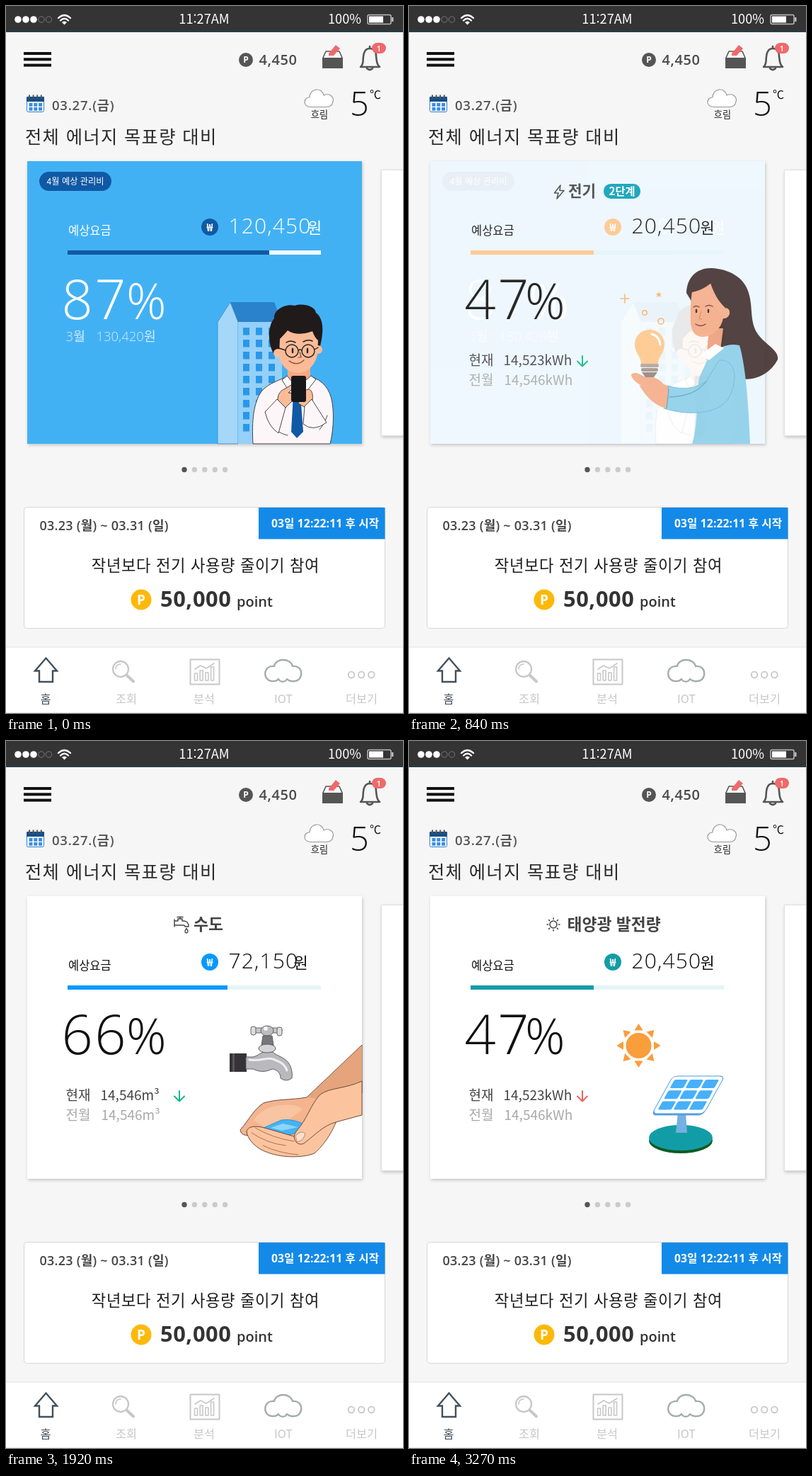
Write an HTML page that moves like this. It is 561 by 998 pixels and loops after 3.3 s.

```html
<!DOCTYPE html>
<html lang="ko">
<head>
<meta charset="utf-8">
<style>
html, body { margin: 0; width: 100%; height: 100%; overflow: hidden; background: #f6f6f7; }
svg { display: block; width: 561px; height: 998px; font-family: 'Open Sans', 'Noto Sans CJK KR', sans-serif; }
.k { font-family: 'Noto Sans CJK KR', 'Noto Sans CJK', sans-serif; }
#mix { isolation: isolate; }
#mix .scene { mix-blend-mode: plus-lighter; }
.card { filter: drop-shadow(1px 2px 2px rgba(0,0,0,.2)); }
.line { fill: none; stroke-linecap: round; stroke-linejoin: round; }
</style>
</head>
<body>
<svg id="stage" viewBox="0 0 561 998"></svg>
<script>
const text = (x, y, size, str, fill, weight = 400, extra = '') =>
  `<text x="${x}" y="${y}" font-size="${size}" fill="${fill}" font-weight="${weight}" ${extra}>${str}</text>`;
const ktext = (x, y, size, str, fill, weight = 400, extra = '') =>
  text(x, y, size, str, fill, weight, 'class="k" ' + extra);
const rect = (x, y, w, h, fill, extra = '') =>
  `<rect x="${x}" y="${y}" width="${w}" height="${h}" fill="${fill}" ${extra}/>`;
const disc = (x, y, r, fill, extra = '') => `<circle cx="${x}" cy="${y}" r="${r}" fill="${fill}" ${extra}/>`;
const path = (d, fill, extra = '') => `<path d="${d}" fill="${fill}" ${extra}/>`;
const line = (d, color, w, extra = '') =>
  `<path class="line" d="${d}" stroke="${color}" stroke-width="${w}" ${extra}/>`;
const ring = (x, y, r, color, w) => disc(x, y, r, 'none', `stroke="${color}" stroke-width="${w}"`);
const list = (n, f) => Array.from({ length: n }, (_, i) => f(i)).join('');
const mid = 'text-anchor="middle"';
const gap = n => `letter-spacing="${n}"`;
const edge = (color, w = 1) => `stroke="${color}" stroke-width="${w}" stroke-linejoin="round"`;

function statusBar() {
  return rect(0, 0, 561, 36, '#343434') + rect(0, 35.5, 561, 1.5, '#20424e') +
    list(3, i => disc(17 + i * 11, 19, 4.8, '#fff')) +
    list(2, i => ring(50 + i * 10.5, 19, 4.2, '#777', 1)) +
    line('M74 17Q82.5 9 91 17M77 20.5Q82.5 15 88 20.5', '#fff', 2.4) +
    path('M79 23Q82.5 20 86 23L82.5 26.5Z', '#fff') +
    ktext(280, 25, 18.2, '11:27AM', '#fff', 500, mid) +
    ktext(455, 25, 18.2, '100%', '#fff', 500) +
    rect(511, 12.5, 33, 13, 'none', 'rx="2" stroke="#bbb" stroke-width="1.5"') +
    rect(513, 14.5, 20, 9, '#fff') + rect(545, 16, 2.5, 6, '#bbb');
}

function header() {
  return list(3, i => rect(25, 65 + i * 8.3, 39, 4, '#111')) +
    disc(339, 76, 10, '#555') + text(339, 80.2, 12, 'P', '#fff', 700, mid) +
    text(357.5, 83, 20, '4,450', '#4a4a4a', 600, gap(.6)) +
    line('M448 73L452 64H471L475 73', '#555', 1.6) + rect(447, 73, 29, 15, '#555') +
    path('M456 67L466 55L472 60L463 70H456Z', '#f0696a') +
    line('M501 86C506 82 504 77 505 71C506 63 510 60 514 60C519 60 523 63 523 71C524 77 523 82 528 86Z', '#555', 2.6) +
    line('M514 57V60M510 88Q514 92 518 88', '#555', 2.6) +
    rect(517, 52, 20, 15, '#f0696a', 'rx="7.5"') + text(527, 63.5, 11, '1', '#fff', 600, mid) +
    rect(29.5, 128.5, 24, 21, '#fff', 'rx="2" stroke="#2f7bc8"') + rect(29, 128, 25, 7, '#164f87', 'rx="1"') +
    list(4, i => rect(32 + i * 5.6, 125.5, 2, 5, '#555')) +
    list(6, i => rect(32.5 + i % 3 * 6.8, 137 + (i > 2) * 6, 5, 4.8, '#3a8ee6')) +
    text(65, 147, 18.6, '03.27.(금)', '#555', 600, gap(.75)) +
    path('M430 142.5C419 142 420 129 429 129C429 116 446 114 449 126C458 122 464 129 462 135C461 141 457 142.5 453 142.5Z', '#fff', edge('#999', 1.2)) +
    ktext(443, 158, 13.2, '흐림', '#222', 400, mid) +
    text(486, 155, 47, '5', '#111', 350) + ktext(514, 131, 16, '℃', '#111', 500) +
    ktext(27, 193.5, 25.3, '전체 에너지 목표량 대비', '#2a2a2a', 300, gap(1.35));
}

function eventCard() {
  return list(5, i => disc(252 + i * 14.4, 654.5, 3.7, i ? '#cbcbcd' : '#555')) +
    rect(25.5, 707.5, 510, 171, '#fff', 'rx="4" stroke="#d6d6d8"') +
    rect(357, 708, 178.5, 44.5, '#138ae8') +
    text(47.5, 740, 18, '03.23 (월) ~ 03.31 (일)', '#444', 600, gap(.25)) +
    text(375, 735.5, 15.6, '03일 12:22:11 후 시작', '#fff', 700, gap(.15)) +
    ktext(282, 798, 22.2, '작년보다 전기 사용량 줄이기 참여', '#1c1c1c', 400, mid + ' ' + gap(.65)) +
    disc(191, 838, 14.5, '#fdb90a') + text(191, 845, 19, 'P', '#fff', 700, mid) +
    text(218, 848, 30.8, '50,000', '#333', 700, gap(.6)) + text(326, 848, 20, 'point', '#333', 600);
}

function navBar() {
  const grey = '#c7c7c9';
  return rect(0, 905, 561, 93, '#fff') + rect(0, 904.5, 561, 1, '#e4e4e6') + rect(0, 997, 561, 1, '#ececec') +
    line('M41 938.5L56.5 920.5L72 938.5H66V954H47V938.5Z', '#40505c', 2.4, 'style="stroke-linejoin:miter"') +
    ring(162, 936, 11, grey, 2.3) + line('M155 936Q155 929 162 929', grey, 1.5) + line('M171 945L180 953.5', grey, 4) +
    rect(260.5, 922.5, 41, 35, 'none', edge(grey, 2)) +
    list(4, i => rect(266.5 + i * 7.7, 942 - [0, 4, 1, 9][i], 4, 10 + [0, 4, 1, 9][i], 'none', edge(grey, 1.6))) +
    line('M267 936L275 931L283 935L294 928', grey, 1.6) +
    line('M379 932C381 920 402 920 405 932C421 930 421 953 407 953C402 954 399 952 397 950C394 955 388 955 385 950C382 954 378 953 376 953C362 952 363 930 379 932Z', '#a3acad', 2.3) +
    list(3, i => ring(488 + i * 14.2, 944, 4.3, grey, 1.8)) +
    ['홈', '조회', '분석', 'IOT', '더보기'].map((s, i) =>
      ktext([56, 170, 280, 392, 502.5][i], 984, 16.3, s, i ? grey : '#40505c', 400, mid)).join('');
}

// Amount, progress bar and large percentage shared by all cards
function meter({ color, end, price, pct, ink = '#111', rest = '#e5f5f8' }) {
  const wonX = 315 + (price.length === 7 ? 111 : pct === 66 ? 91.5 : 96.5);
  return ktext(88, 323, 16.5, '예상요금', ink) +
    disc(288, 312, 12, color) + ktext(288, 317.5, 15, '₩', '#fff', 700, mid) +
    text(314.5, 321, 30, price, ink, 350, gap(1.1)) + ktext(wonX, 321, 22, '원', ink, 300) +
    rect(87, 345, 358, 6, rest) + rect(87, 345, end - 87, 6, color) +
    text(78.5, 442, 77.5, pct, ink, 300, gap(2.5)) + text(pct === 47 ? 164 : 170, 442, 70, '%', ink, 300);
}

const usage = (now, before, arrow) =>
  ktext(84.5, 507, 19, '현재', '#444') + ktext(133.5, 507, 19, now, '#444') +
  ktext(84.5, 535, 19, '전월', '#a9a9a9') + ktext(134.5, 535, 19, before, '#a9a9a9') +
  line('M245 494V508M238 501.5L245 508.5L252 501.5', arrow, 2);

function building() {
  return path('M299 446L317 418L328 446V618H299Z', '#a4d7f8', edge('#3d86c4', .8)) +
    rect(328, 446, 62, 172, '#94d0f8') + path('M317 418H379L390 446H328Z', '#2a82cc') +
    list(27, i => rect(335 + i % 3 * 18, 454 + Math.floor(i / 3) * 17, 9, 10.5, '#2a97e8'));
}

function man() {
  const ink = edge('#3a3335', .9), skin = '#fbbb97', shirt = '#fdf6f8';
  return path('M349 618C347 585 350 560 361 544C371 532 388 528 397 523H430C447 528 458 540 461 560C464 580 462 602 458 618Z', shirt, ink) +
    path('M398 507H430V524L411 541L398 524Z', '#f3aa84') +
    path('M397 522L411 538L404 550L390 528ZM431 522L412 538L420 550L438 527Z', '#fff', ink) +
    path('M406 548H416L420 601L411 610L403 601Z', '#1059a5') +
    path('M379 492C370 478 369 452 379 441C378 428 396 420 408 423C420 419 437 424 438 433C450 442 449 462 443 484L438 492Z', '#211a1b') +
    disc(384, 490, 6, skin) + disc(441, 485, 6, skin) +
    path('M387 470Q393 464 398 458C410 466 425 462 433 459Q436 468 441 472L440 492C437 507 427 517 413 518C398 518 387 507 386 492Z', skin) +
    ring(404, 487, 9, '#222', 1.4) + ring(427, 487, 9, '#222', 1.4) +
    line('M413 486Q415.5 484 418 486M395 486L386 483M436 485L441 482', '#222', 1.4) +
    line('M405 484V489M426 484V489', '#222', 2.4) + line('M396 475Q402 471 409 475M420 474Q427 470 433 473', '#222', 1.5) +
    line('M415 488L417 496H413M400 501Q411 509 421 500', '#8c4b35', 1.2) +
    line('M367 572C372 592 381 602 398 606M443 598Q450 590 454 578', '#3a3335', .9) +
    path('M420 545C429 536 435 544 433 557L425 568L413 561Z', skin, ink) +
    path('M422 565L432 555L453 588Q434 602 420 590Z', shirt, ink) +
    `<g id="arm">` + path('M366 573L383 555L395 567L385 603Q371 594 366 573Z', shirt, ink) +
    path('M384 556C384 548 388 543 393 541L403 535L405 540L399 546L406 547L405 557L395 567Z', skin, ink) + `</g>` +
    rect(403, 522, 21, 37, '#17171a', 'rx="3"');
}

function woman() {
  const skin = '#f5ad88', blue = '#8dcfe8', seam = edge('#66b0d2', .8);
  return path('M392 405C393 383 406 370 427 370C452 371 474 383 480 405C487 428 480 449 496 467C507 480 523 487 521 499C513 515 494 530 468 526L440 485Z', '#43302f') +
    path('M424 455H444L440 486L420 500Z', '#ee9f7c') +
    path('M400 403C397 425 398 435 398 447C399 461 406 468 417 467C431 465 441 455 444 441C454 442 457 427 447 426L431 390Z', skin) +
    path('M392 405C404 404 418 400 426 391C431 406 437 417 448 427L457 400L425 374Z', '#43302f') +
    line('M402 425Q406 422 410 425M419 424Q424 421 429 424M405 449Q412 454 419 449', '#7a3d32', 1.4) +
    line('M406 429V432M423 429V432', '#382725', 2.4) + line('M413 431L410 442H414', '#d7876a', 1.1) +
    path('M424 494C440 480 452 476 467 479C477 512 480 575 482 618H400C409 590 406 554 410 525Z', blue) +
    path('M411 493L433 477L445 483L424 500Z', '#fff') +
    path('M314 520C322 514 329 523 336 524C344 522 353 526 360 534L369 537L366 548C350 545 334 542 327 535C320 531 314 525 314 520Z', skin) +
    path('M366 536C388 543 406 539 420 530L438 500C460 498 467 524 452 553C440 573 403 581 360 568L367 552Z', blue, seam) +
    path('M325 535C337 539 351 541 367 544L364 568C350 565 337 555 325 535Z', skin) +
    line('M367 541L364 568M420 530C410 544 393 551 368 552', '#4c97c0', 1);
}

function bulb() {
  const c = '#ffc78c', s = '#f9b26c';
  return path('M328 506C329 496 319 490 319 478C319 466 328 457 340 457C352 457 361 466 361 478C361 490 351 496 352 506Z', c) +
    line('M343 463Q354 466 355 478', '#fff', 3) +
    rect(327, 505, 26, 5, '#b6a39a', 'rx="2"') + rect(328, 511, 24, 5, '#a6958d', 'rx="2"') + path('M329 517H351L346 524H334Z', '#95857f') +
    line('M299 413H311M305 407V419', s, 1.6) +
    path('M353 403.5L354.3 406H357L355 408L356 411L353 409.5L350 411L351 408L349 406H351.7Z', s) +
    ring(333, 433, 3.3, s, 1.5) + ring(356, 445, 4, s, 1.6);
}

function faucet() {
  const ink = edge('#555', .9);
  return rect(316, 441, 24, 26, '#353337') + rect(320, 441, 3, 26, '#555') +
    path('M339 446H349C355 445 358 441 364 439H377C383 445 393 446 399 454C404 461 405 470 404 476Q396 482 388 476C388 468 383 464 376 463C364 469 356 466 349 463H339Z', '#b9b9bd', ink) +
    line('M344 450C361 453 371 444 382 451Q394 455 397 465', '#eee', 3) +
    path('M363 416H376L378 430H361Z', '#77777b', ink) +
    `<ellipse cx="369" cy="434" rx="12" ry="6" fill="#d4d4d7" ${ink}/>` +
    rect(347, 405, 43, 7, '#c9c9cc', `rx="3" ${ink}`) +
    rect(346, 403, 7, 12, '#ddd', `rx="3" ${ink}`) + rect(383, 404, 7, 12, '#ddd', `rx="3" ${ink}`) +
    `<ellipse cx="369" cy="409" rx="9" ry="7" fill="#bcbcc0" ${ink}/>` + disc(367, 406, 3, '#f4f4f4');
}

function hands() {
  const ink = edge('#6c4a3c', 1), light = '#fbc49e';
  return path('M503 429L425 503C402 507 383 505 364 511C350 520 344 534 331 549C332 558 343 558 350 554L410 568L446 548L503 497Z', '#f3b48e', ink) +
    path('M503 430L426 503L444 505L503 482Z', '#e5a47c') +
    path('M350 535Q363 516 389 514Q411 512 419 520L398 536L366 546Z', '#f8c4a1') +
    path('M364 546L389 535Q407 532 427 544Q404 561 379 555Z', '#45b2f2', edge('#2788cc', .8)) +
    path('M374 546L391 540L413 545L390 550Z', '#8ad6fb') +
    path('M340 551C342 543 354 543 365 546L410 559L468 534C459 558 445 574 436 582C415 590 382 588 361 577C350 571 341 561 340 551Z', light, ink) +
    line('M347 553Q369 568 395 571M352 546Q378 561 407 565M363 571Q386 582 413 584', '#a87358', 1) +
    path('M503 480C480 491 458 489 444 499C430 514 426 533 411 550C402 560 411 573 421 568C437 556 448 543 466 538L503 528Z', light, ink) +
    path('M409 557Q417 549 423 554Q420 565 411 566Z', '#fee1cc', edge('#a87358', .8));
}

function solar() {
  return `<ellipse cx="384" cy="564" rx="45" ry="18" fill="#0c5c22"/><ellipse cx="384" cy="560" rx="45" ry="18" fill="#129da6"/>` +
    path('M380 525H391L393 553H377Z', '#74b0e2') +
    `<g transform="translate(373 473) skewX(-29)">` +
    rect(0, 2.5, 73, 53, '#5aa0df', 'rx="6"') + rect(0, 0, 73, 53, '#fff', 'rx="6" stroke="#4a9ae0"') +
    list(9, i => rect(5 + i % 3 * 22, 5 + Math.floor(i / 3) * 15.3, 19, 12, '#46b0fb', 'rx="2"')) + `</g>` +
    `<g id="sun">` + disc(324.5, 430, 18, '#fa9d3b') +
    list(8, i => path('M318.5 408.5L324.5 399L330.5 408.5Z', '#fa9d3b', `transform="rotate(${i * 45} 324.5 430)"`)) + `</g>`;
}

const green = '#12b886', won = '#1059a5';
const cards = [
  rect(30, 219, 473, 399, '#42b1f4') + rect(47, 234, 102, 27, won, 'rx="13.5"') +
    ktext(98, 252, 12.2, '4월 예상 관리비', '#fff', 500, mid) +
    meter({ color: won, end: 372, price: '120,450', pct: 87, ink: '#fff', rest: '#f4faff' }) +
    text(84.5, 473, 18.5, '3월', '#d4ecfc', 300) + text(127.5, 473, 18.5, '130,420원', '#d4ecfc', 300) +
    building() + man(),
  line('M214 253L205.5 264H211L209 272L219 260.5H213Z', '#444', 1.5) +
    ktext(225, 268.5, 21.3, '전기', '#444', 700) +
    rect(275, 251, 52, 21, '#0c9fb5', 'rx="10"') + ktext(301, 267, 15.3, '2단계', '#fff', 700, mid) +
    meter({ color: '#ffc78c', end: 261, price: '20,450', pct: 47 }) +
    usage('14,523kWh', '14,546kWh', green) + woman() + bulb(),
  line('M238 252V262M238 254H243V251H249V254H251C256 254 258 258 258 262H253Q253 260 250 260H238M246 251V248.5M242 248.5H250', '#444', 1.5) +
    line('M255 264.5Q259 270 255 271Q251 270 255 264.5', '#444', 1.3) +
    ktext(265, 267, 22.8, '수도', '#444', 700) +
    meter({ color: '#0799ff', end: 313, price: '72,150', pct: 66 }) +
    usage('14,546m³', '14,546m³', green) + faucet() + hands(),
  ring(204, 259, 5, '#444', 1.5) +
    list(8, i => line('M204 251.5V250', '#444', 1.5, `transform="rotate(${i * 45} 204 259)"`)) +
    ktext(223.5, 267, 22.8, '태양광 발전량', '#444', 700) +
    meter({ color: '#129da6', end: 261, price: '20,450', pct: 47 }) +
    usage('14,523kWh', '14,546kWh', '#f0625e') + solar()
].map(c => `<g class="scene">${c}</g>`);

// The blue card fades beneath; the white cards blend additively above it
const stage = document.getElementById('stage');
stage.innerHTML = rect(0, 0, 561, 998, '#f6f6f7') + statusBar() + header() +
  rect(530.5, 231.5, 40, 375, '#fff', 'class="card" stroke="#e3dfe0"') +
  rect(30, 219, 473, 399, '#fff', 'class="card"') +
  cards[0] + `<g id="mix">${cards.slice(1).join('')}</g>` + eventCard() + navBar();

const scenes = [...stage.querySelectorAll('.scene')];
const arm = document.getElementById('arm'), sun = document.getElementById('sun');
const ramp = (t, start, span) => Math.min(1, Math.max(0, (t - start) / span));

function draw() {
  const t = Math.floor(performance.now() % 3300 / 30) * 30;
  const shown = [1, ramp(t, 540, 330), ramp(t, 1590, 330), ramp(t, 2370, 300), 0];
  scenes.forEach((s, i) => {
    const o = shown[i] - shown[i + 1];
    s.style.opacity = o;
    s.style.display = o > 0 ? '' : 'none';
  });
  arm.setAttribute('transform', `rotate(${-3 * Math.sin(Math.PI * ramp(t, 0, 270))} 376 602)`);
  sun.setAttribute('transform', `rotate(${45 * ramp(t, 2370, 900)} 324.5 430)`);
  requestAnimationFrame(draw);
}
draw();
</script>
</body>
</html>
```
